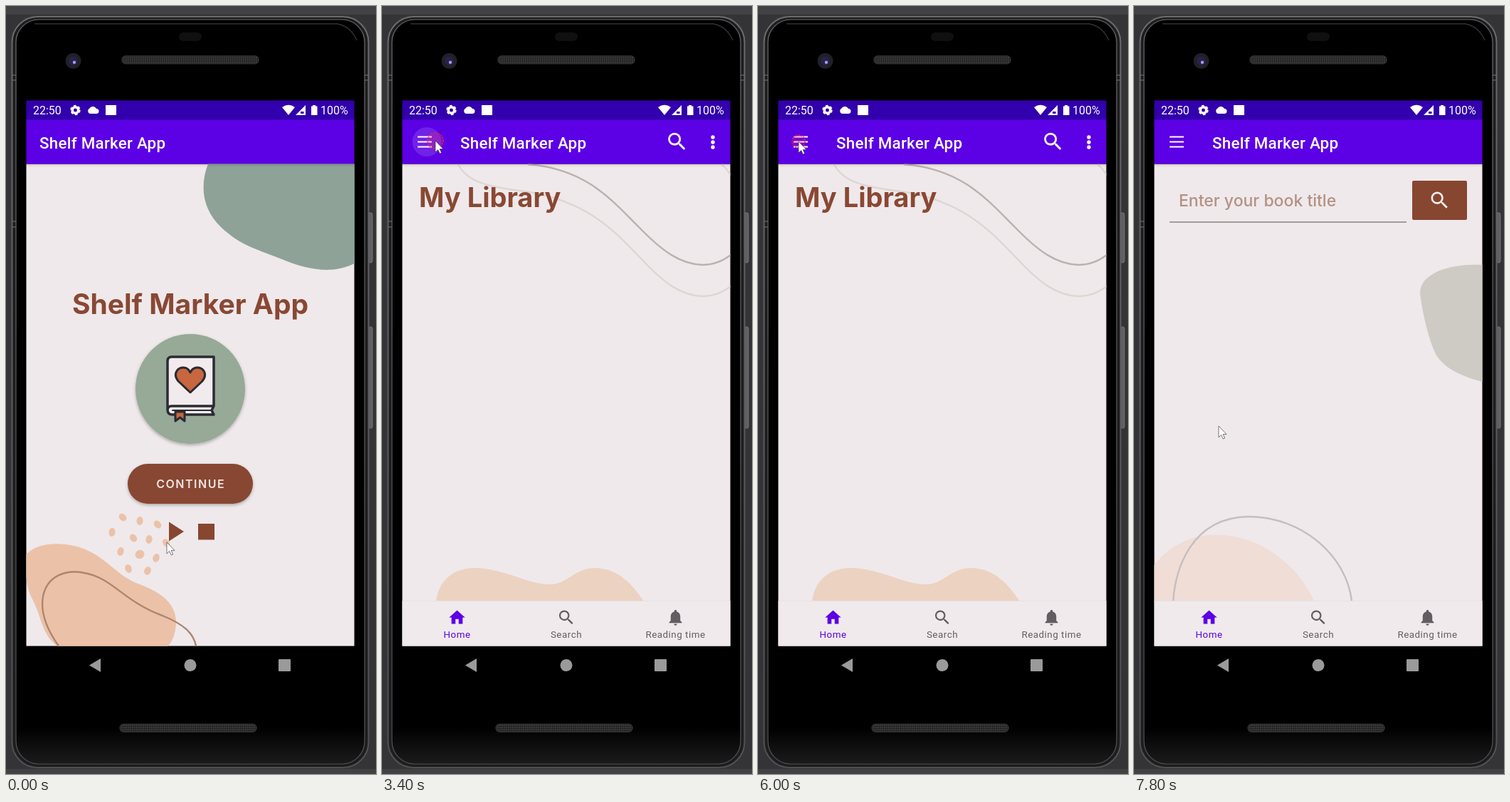
Recreate the animation shown at these times as an HTML page. Size 520x1077 px, loop 8000 ms.

```html
<!DOCTYPE html>
<html lang="en">
<head>
<meta charset="utf-8">
<title>Reading app demo</title>
<style>
html, body { margin: 0; width: 100%; height: 100%; overflow: hidden; background: #343437; }
svg { display: block; }
text { font-family: Roboto, sans-serif; }
.bar { font-size: 22.4px; font-weight: 500; letter-spacing: .25px; fill: #fff; }
.status { font-size: 16px; fill: #fff; }
.head { font: 700 38px Inter, sans-serif; fill: #894833; }
.nav { font-size: 13.4px; letter-spacing: .5px; text-anchor: middle; }
.item { font-size: 15.7px; font-weight: 500; letter-spacing: .1px; }
.line { fill: none; stroke-width: 2.4; }
</style>
</head>
<body>
<svg width="520" height="1077" viewBox="0 0 520 1077">
<defs>
  <path id="house" d="M10 20v-6h4v6h5v-8h3L12 3 2 12h3v8z"/>
  <path id="lens" d="M15.5 14h-.79l-.28-.27A6.47 6.47 0 0 0 16 9.5 6.5 6.5 0 1 0 9.5 16c1.61 0 3.09-.59 4.23-1.57l.27.28v.79l5 4.99L20.49 19zm-6 0C7.01 14 5 11.99 5 9.5S7.01 5 9.5 5 14 7.01 14 9.5 11.99 14 9.5 14z"/>
  <path id="bell" d="M12 22c1.1 0 2-.9 2-2h-4c0 1.1.89 2 2 2zm6-6v-5c0-3.07-1.64-5.64-4.5-6.32V4c0-.83-.67-1.5-1.5-1.5s-1.5.67-1.5 1.5v.68C7.63 5.36 6 7.92 6 11v5l-2 2v1h16v-1z"/>
  <path id="page" d="M28.500 221.500H489.500V897.500H28.500Z"/>
  <path id="appbar" fill="#5c00e5" d="M28.500 159.500H489.500V221.500H28.500Z"/>
  <clipPath id="content"><use href="#page"/></clipPath>
  <pattern id="mesh" width="3" height="3" patternUnits="userSpaceOnUse"><path d="M0 0H3V3H0Z" fill="#252525"/><path d="M0 0H1.5V1.5H0Z" fill="#474747"/></pattern>
  <linearGradient id="chin" x2="0" y2="1"><stop offset=".95" stop-color="#000"/><stop offset="1" stop-color="#1b1b1c"/></linearGradient>
  <linearGradient id="fall" x2="0" y2="1"><stop stop-color="#000" stop-opacity=".12"/><stop offset="1" stop-color="#000" stop-opacity="0"/></linearGradient>
  <linearGradient id="edge"><stop stop-color="#000" stop-opacity=".3"/><stop offset="1" stop-color="#000" stop-opacity="0"/></linearGradient>
  <linearGradient id="metal" x2="0" y2="1"><stop stop-color="#6c6c6f"/><stop offset=".5" stop-color="#5c5c5f"/><stop offset="1" stop-color="#505053"/></linearGradient>
  <filter id="soft" x="-20%" y="-20%" width="140%" height="150%"><feDropShadow dx="0" dy="2" stdDeviation="2" flood-opacity=".28"/></filter>
</defs>

<!-- phone -->
<path fill="#343437" d="M0 0H520V1077H0Z"/>
<path fill="#424244" d="M0 0H520V12H0ZM0 1070H520V1077H0Z"/>
<g fill="#606063" stroke="#7c7c7f" stroke-width=".8">
  <rect x="509.500" y="290" width="5.500" height="70" rx="2"/>
  <rect x="509.500" y="450" width="5.500" height="142" rx="2"/>
</g>
<rect x="8.500" y="15" width="501" height="1053" rx="36" fill="#1d1d1e" stroke="url(#metal)" stroke-width="2"/>
<rect x="14" y="19" width="490" height="1044" rx="32" fill="url(#chin)" stroke="url(#metal)" stroke-width="1.200"/>
<path d="M9 97H14M9 104H14M9 302H14M9 310H14M504 97H509M504 104H509" stroke="#777779"/>
<path d="M40 25H465Q484 28 493 48" fill="none" stroke="#303032" stroke-width="1.500"/>
<rect x="163" y="70" width="192" height="11" rx="5" fill="url(#mesh)" stroke="#3b3b3b"/>
<rect x="160" y="1007" width="192" height="11" rx="5" fill="url(#mesh)" stroke="#3b3b3b"/>
<rect x="243" y="37" width="32" height="12" rx="6" fill="#101010"/>
<circle cx="94.500" cy="77" r="11" fill="#202025"/>
<circle cx="94.500" cy="77" r="6.500" fill="#252348"/>
<circle cx="96" cy="79" r="2.200" fill="#a49ae8"/>
<g fill="#9a9a9a">
  <path d="M117 924.500L133 915V934Z"/><circle cx="259" cy="924.500" r="8.500"/>
  <rect x="383" y="916" width="17" height="17" rx="1"/>
</g>

<!-- status bar -->
<path fill="#3200ac" d="M28.500 132.500H489.500V160H28.500Z"/>
<text class="status" x="38" y="152">22:50</text>
<text class="status" x="442" y="152">100%</text>
<g fill="none" stroke="#fff">
  <circle cx="97.500" cy="146" r="4.300" stroke-width="3.600"/>
  <circle cx="97.500" cy="146" r="6.200" stroke-width="2" stroke-dasharray="3.500 2.990"/>
</g>
<g fill="#fff">
  <path d="M118 151A4 4 0 0 1 117.500 143.500 5.500 5.500 0 0 1 127 144 3.500 3.500 0 0 1 127 151Z"/>
  <path d="M140 139H155V153H140Z"/>
  <path d="M388 142Q397 135.500 406 142L397 153Z"/>
  <path d="M407 153L421 139V153Z"/>
  <path d="M429 140.500H431V139H435V140.500H437.500V153H429Z"/>
</g>
<path fill="#3200ac" d="M414 148H418.500V151H414Z"/>

<g id="home">
  <use href="#page" fill="#efe9eb"/>
  <use href="#appbar"/>
  <text class="bar" x="47" y="199.500">Shelf Marker App</text>
  <path fill="#8fa297" d="M284 221.500C272 252 276 285 302 310C330 336 350 340 385 354C425 371 460 376 489.500 361V221.500Z"/>
  <path fill="url(#fall)" d="M28.500 221.500H489.500V226H28.500Z"/>
  <path fill="#ebc2a8" d="M28.500 769C45 752 75 752 100 758C140 770 150 795 185 810C220 822 240 840 239 866C238 882 234 890 228 897.500H72C55 885 50 865 45 850C38 830 30 825 28.500 800Z"/>
  <path class="line" stroke="#ae866e" d="M74 897.500C58 875 48 850 52 828C58 798 85 790 110 795C150 802 165 835 220 855C250 867 264 880 267 897.500"/>
  <g id="dots" fill="#ebc2a8"></g>
  <text class="head" x="259" y="432" style="font-size:39px;text-anchor:middle">Shelf Marker App</text>
  <circle cx="259" cy="537" r="77" fill="#97a997" filter="url(#soft)"/>
  <g stroke="#2b2b32" stroke-width="3.500" stroke-linejoin="round" stroke-linecap="round">
    <path fill="#f2ebee" d="M292 561V492H233Q227 492 227 498V566Q227 573 234 573H292L289 567 292 561H233Q227 561 227 567"/>
    <path d="M234 567H288" stroke-width="2"/>
    <path fill="#c86640" stroke-width="3" d="M238 569H251V582L244.500 577 238 582Z"/>
    <path fill="#c86640" stroke-width="3" d="M259 542L242 526C234 516 241 507 249 507Q256 507 259 514Q262 507 269 507C277 507 284 516 276 526Z"/>
  </g>
  <rect x="171" y="642" width="176" height="56" rx="28" fill="#874630" filter="url(#soft)"/>
  <rect id="press" x="171" y="642" width="176" height="56" rx="28" fill="#fff" opacity=".18"/>
  <text x="259.700" y="676" text-anchor="middle" style="font:600 16px Inter,sans-serif;letter-spacing:1.500px" fill="#f1e5e2">CONTINUE</text>
  <path fill="#874630" d="M229 723.500L250 737 229 750.500ZM270 726H293V748.500H270Z"/>
</g>

<g id="main">
  <use href="#page" fill="#efe9eb"/>
  <use href="#appbar"/>
  <text class="bar" x="110" y="199.500">Shelf Marker App</text>
  <g id="library">
    <g class="line" clip-path="url(#content)">
      <path stroke="#ded6d2" d="M107 222C122 252 165 255 200 260C290 272 330 320 362 352C395 388 420 406 450 407C468 407 480 401 490 393M477 222Q484 227 490 237"/>
      <path stroke="#bbb1ae" d="M205 222C290 228 328 278 362 311C395 345 420 362 450 363C468 363 480 357 490 349"/>
    </g>
    <path fill="#ecd2c0" d="M76 835C80 805 100 788 132 788C175 790 205 811 235 811C262 811 270 788 300 788C335 790 352 812 368 835Z"/>
    <text class="head" x="52" y="282">My Library</text>
    <use href="#lens" fill="#fff" transform="translate(398 173.500) scale(1.380)"/>
    <g fill="#fff"><circle cx="465" cy="184" r="2.700"/><circle cx="465" cy="191" r="2.700"/><circle cx="465" cy="198" r="2.700"/></g>
  </g>
  <g id="search">
    <path fill="#cecac4" d="M489.500 363C450 361 402 372 402 403C404 420 412 465 425 490C440 512 465 520 489.500 527Z"/>
    <path fill="#efddd6" d="M28.500 784C70 732 130 735 175 755C215 775 240 805 253 835H28.500Z"/>
    <path class="line" stroke="#c6bebf" d="M55 835C58 790 80 718 160 716C240 716 300 775 306 835"/>
    <text x="63" y="281" style="font:500 23px Inter,sans-serif" fill="#b39183">Enter your book title</text>
    <path d="M50 303H383" stroke="#8b8283" stroke-width="1.500"/>
    <rect x="391" y="245" width="77" height="55" rx="2" fill="#874630"/>
    <use href="#lens" fill="#f4eeee" transform="translate(413.500 256.500) scale(1.330)"/>
  </g>
  <path fill="url(#fall)" d="M28.500 221.500H489.500V226H28.500Z"/>
  <path fill="#f0eaec" d="M28.500 834.500H489.500V897.500H28.500Z"/>
  <path stroke="#e8e2e4" d="M28.500 834.500H489.500"/>
  <g id="tabs"></g>
  <g clip-path="url(#content)">
    <use id="scrim" href="#page"/>
    <g id="drawer">
      <path fill="url(#edge)" d="M342.500 221H348V898H342.500Z"/>
      <path fill="#fff" d="M28 221H342.500V898H28Z"/>
      <path fill="#f9d9be" d="M28 221H342.500V504H28Z"/>
      <path fill="#f3c197" d="M47 430C52 385 40 330 62 320C85 312 98 325 115 340V430ZM195 310C200 290 240 292 262 300C300 310 322 300 323 335C324 365 328 395 310 417H195Z"/>
      <ellipse cx="190" cy="433" rx="142" ry="6" fill="#efbd90"/>
      <path class="line" stroke="#fce9d8" style="stroke-width:1.200" d="M62 370Q50 340 48 330M90 350Q75 310 62 308M290 370Q305 320 322 308M286 380Q315 350 328 345M291 345Q300 325 295 315M305 335L322 325"/>
      <g id="books"></g>
      <!-- older reader with cane -->
      <path class="line" stroke="#36211f" d="M61 428L59 378Q56 373 53 378"/>
      <path fill="#c9674f" d="M71 395H78L77 426H70ZM82 395H90L89 426H82Z"/>
      <path fill="#3a2a32" d="M69 425H78V430H67ZM81 425H89L92 430H80Z"/>
      <path fill="#9dc5e8" d="M68 373H92L91 401H81L80 388 78 401H67Z"/>
      <path fill="#ee6f7b" d="M70 348Q82 343 92 349L95 375H67L69 362 61 374 56 371Z"/>
      <path d="M93 360L108 365M59 372L60 380" stroke="#c9674f" stroke-width="5"/>
      <ellipse cx="86" cy="339" rx="6" ry="8" fill="#c9674f"/>
      <path fill="#fff" d="M78 344C72 325 88 326 92 334Q84 333 83 345Z"/>
      <path fill="#fff" d="M106 349L119 346 123 365 110 368Z"/>
      <!-- seated reader -->
      <path fill="#9dc5e8" d="M93 306C95 290 120 288 135 293C155 287 190 290 195 318C198 342 178 340 165 326C150 330 142 307 129 317C110 325 106 310 93 306Z"/>
      <path fill="#c64c37" d="M164 316Q166 304 180 304Q190 306 188 325Q184 337 177 337L180 349H164Z"/>
      <path fill="#9dc5e8" d="M163 323C160 302 181 296 190 307Q175 306 170 323Z"/>
      <g class="line" style="stroke-width:1.300" stroke="#fff"><circle cx="178" cy="320" r="5"/><circle cx="189" cy="322" r="5"/></g>
      <path fill="#fff" d="M149 356C156 342 178 339 190 349L199 382 152 402Z"/>
      <path fill="#c4452d" d="M149 427C147 399 172 390 204 380C222 370 230 373 238 394L253 423 237 428 216 397C205 417 190 428 172 429Z"/>
      <path fill="#1d1a20" d="M233 424L247 419 258 433H227Z"/>
      <path fill="#383b68" d="M193 334L228 342 211 373 183 363Z"/>
      <path d="M228 342L211 373" stroke="#22223f" stroke-width="3"/>
      <path class="line" stroke="#c64c37" style="stroke-width:7;stroke-linejoin:round" d="M166 358L180 372 207 354M207 335L211 322"/>
      <path d="M213 325L217 311" stroke="#c64c37" stroke-width="3"/>
      <!-- girl in armchair -->
      <path fill="#8fbbe3" d="M250 392Q250 383 260 385H284Q293 383 292 395V416H252Z"/>
      <path d="M255 416V426M286 416V426" stroke="#3a2222" stroke-width="2"/>
      <path class="line" stroke="#e9647a" style="stroke-width:8;stroke-linejoin:round" d="M266 394L288 383 306 404M270 397L293 391 313 389"/>
      <path fill="#c4452d" d="M303 402L325 406V409H305ZM309 391L324 386 326 388 311 394Z"/>
      <path fill="#343863" d="M254 376Q263 370 270 377L274 394H256Z"/>
      <circle cx="262" cy="370" r="5.500" fill="#c64c37"/>
      <path fill="#1d1a20" d="M246 367A6 6 0 0 1 256 360 6 6 0 0 1 266 365L258 371Q250 374 246 367Z"/>
      <path fill="#fff" d="M277 375L290 371 287 382 274 385Z"/>
      <g id="items"></g>
    </g>
  </g>
  <circle id="ripple" cx="63" cy="190.500" r="20.500" fill="#fff" opacity=".13"/>
  <path id="burger" class="line" style="stroke-width:2.200" stroke="#fff"/>
</g>
<circle id="click" fill="#f0305a" fill-opacity=".3" stroke="#ee2848" stroke-width="2" stroke-dasharray="2 1.500" opacity=".75"/>
<path id="cursor" d="M0 0V16L3.700 12.500 6.200 18 8.700 17 6.200 11.600H11Z" fill="#fff" stroke="#222" stroke-width=".6"/>
</svg>
<script>
const $ = id => document.getElementById(id);
const lerp = (a, b, p) => a + (b - a) * p;
const clamp = v => Math.min(1, Math.max(0, v));
const rect = (x, y, w, h, fill) => `<rect x="${x}" y="${y}" width="${w}" height="${h}" fill="${fill}"/>`;
const icon = (name, x, y, scale, fill) =>
  `<use href="#${name}" fill="${fill}" transform="translate(${x - 12 * scale} ${y - 12 * scale}) scale(${scale})"/>`;

$('dots').innerHTML = [[164, 717], [188, 722], [213, 727], [149, 738], [179, 746], [201, 748],
  [225, 753], [161, 765], [188, 769], [211, 774], [172, 789], [199, 792]]
  .map(([x, y], i) => `<ellipse cx="${x}" cy="${y}" rx="${i == 8 ? 6.5 : 4.6}" ry="6" transform="rotate(${i * 47 % 90 - 45} ${x} ${y})"/>`).join('');

$('tabs').innerHTML = [['house', 'Home', 105.5, '#5c00e5'], ['lens', 'Search', 259, '#625d60'], ['bell', 'Reading time', 412.5, '#625d60']]
  .map(([name, label, x, fill]) => icon(name, x, 857.5, 1.12, fill) +
    `<text class="nav" x="${x}" y="886" fill="${fill}">${label}</text>`).join('');

$('items').innerHTML = [['house', 'Home'], ['lens', 'Search'], ['bell', 'Set time']]
  .map(([name, label], i) => icon(name, 67, 540 + 54 * i, 1.12, '#000') +
    `<text class="item" x="96.500" y="${546 + 54 * i}">${label}</text>`).join('');

function drawBooks() {
  let out = '';
  for (let i = 0; i < 8; i++) {
    const x = 204 + i * 5 % 9, y = 313 + i * 14;
    out += rect(x, y, 74 + i * 3 % 7, 14, ['#fff', '#e9707a', '#fff7ee'][i % 3]) +
      rect(x - 2, y + 11, 80, 2.5, i % 2 ? '#b98a4b' : '#d1523f');
  }
  out += '<circle cx="260" cy="319" r="3" fill="#f3c197"/>' + rect(92, 326, 59, 104, '#47221b');
  const spines = ['#e0b66f', '#c8534a', '#efd09b', '#a8763f', '#e9a06a'];
  for (let row = 0; row < 5; row++) {
    const y = 333 + row * 19;
    out += rect(96, y, 52, 15, '#6f3526');
    for (let i = 0; i < 17; i++) {
      const h = 11 + (i * 7 + row * 3) % 4;
      const fill = row ? spines[(i * 3 + row * 2 + (i >> 2)) % 5] : ['#e8566f', '#ee8090'][i % 2];
      out += rect(96.5 + i * 3, y + 15 - h, 2.4, h, fill);
    }
  }
  return out;
}
$('books').innerHTML = drawBooks();

// time, x, y of the pointer tip
const path = [[0, 226, 752], [400, 275, 780], [800, 340, 795], [1200, 240, 690], [1400, 231, 674],
  [1900, 231, 674], [3200, 80, 192], [3400, 75, 189], [3600, 75, 189], [4200, 155, 530],
  [4600, 125, 536], [5100, 125, 536], [5800, 60, 195], [6000, 57, 190], [6200, 57, 190],
  [6400, 61, 250], [7000, 119, 589], [8000, 119, 589]];
const clicks = { 1600: 11, 3400: 11, 4800: 11, 6000: 9, 7200: 11 };

function pointer(t) {
  const i = path.findIndex(k => k[0] > t);
  const [t0, x0, y0] = path[i - 1], [t1, x1, y1] = path[i];
  const p = (t - t0) / (t1 - t0);
  return [lerp(x0, x1, p), lerp(y0, y1, p)];
}

const settle = (t, start) => 1 - (1 - clamp((t - start) / 400)) ** 4;
const openness = t => settle(t, 3500) - settle(t, 4900) + settle(t, 6120) - settle(t, 7300);

// menu lines that turn into a back arrow
function burger(p) {
  const wing = s => `M${lerp(50, 51.5, p)} ${lerp(190.5 + 7 * s, 190.5, p)}L${lerp(70, 60.5, p)} ${190.5 + s * lerp(7, 9, p)}`;
  $('burger').setAttribute('d', `${wing(-1)}${wing(1)}M${lerp(50, 52, p)} 190.5H${lerp(70, 68.5, p)}`);
  $('burger').setAttribute('transform', `rotate(${180 * (p - 1)} 60 190.5)`);
}

const show = (id, on) => $(id).style.display = on ? '' : 'none';

function draw(now) {
  const t = Math.floor(now % 8000 / 200) * 200;
  const p = openness(t), [x, y] = pointer(t), searching = t > 7300;
  $('main').style.opacity = clamp((t - 1600) / 300);
  show('main', t > 1600);
  show('home', t < 2000);
  show('press', t == 1600);
  show('library', !searching);
  show('search', searching);
  show('ripple', t == 3400 || t == 6200);
  show('drawer', p > .001);
  $('scrim').setAttribute('opacity', .6 * p);
  $('drawer').setAttribute('transform', `translate(${-314 * (1 - p)} 0)`);
  burger(p);
  $('cursor').setAttribute('transform', `translate(${x} ${y})`);
  $('click').setAttribute('transform', `translate(${x} ${y})`);
  $('click').setAttribute('r', clicks[t] || 0);
  show('click', clicks[t]);
  requestAnimationFrame(draw);
}
requestAnimationFrame(draw);
</script>
</body>
</html>
```
